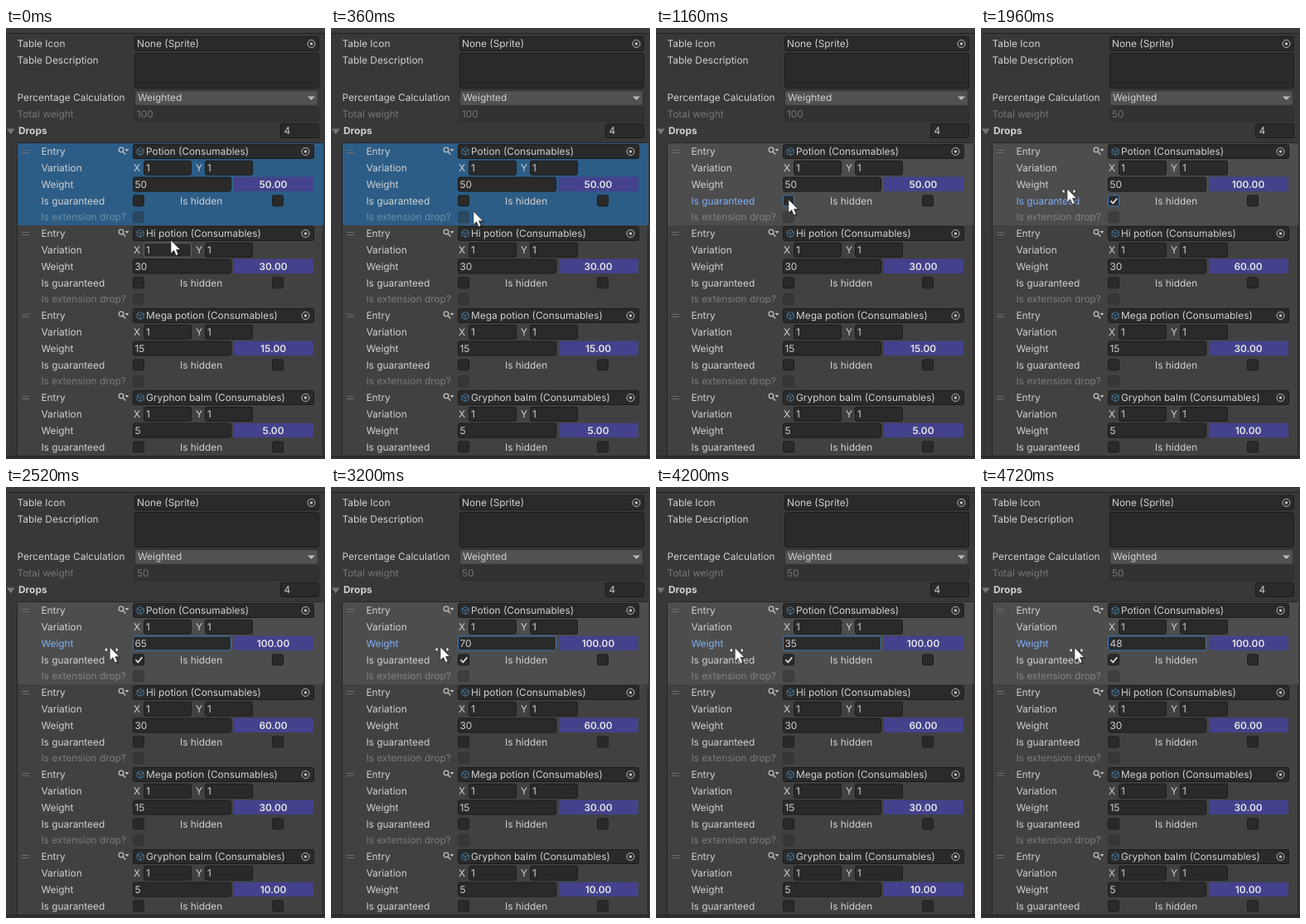
An HTML page that plays this animation: 385x520 px, repeating every 5.28 s.

```html
<!DOCTYPE html>
<html lang="en">
<head>
<meta charset="utf-8">
<title>Drop table inspector</title>
<style>
  html, body { margin: 0; width: 100%; height: 100%; overflow: hidden; background: #383838; }
  svg { display: block; width: 385px; height: 520px; }
  text { font: 11.88px Inter, Roboto, sans-serif; fill: #d0d0d0; white-space: pre; text-rendering: geometricPrecision; }
  .bold { font-weight: 700; }
  .share { text-anchor: middle; font-weight: 600; fill: #e6e6e6; }
  .dim { opacity: .4; }
  .field { fill: #2a2a2a; stroke: #1c1c1c; }
  .line { fill: none; stroke: #bdbdbd; }
  .cube { fill: none; stroke: #46799c; }
</style>
</head>
<body>
<svg id="stage" viewBox="0 0 385 520"></svg>
<script>
const LOOP = 5280, STEP = 40, ROW = 19.8;
const FOCUS = '#7fb0f8', RING = '#3a79bb';
const names = ['Potion', 'Hi potion', 'Mega potion', 'Gryphon balm'];
const weights = [50, 30, 15, 5];

const attr = (id, cls) => (id ? ` id="${id}"` : '') + (cls ? ` class="${cls}"` : '');
const text = (x, cy, s, cls, id) => `<text x="${x}" y="${cy + 4.2}"${attr(id, cls)}>${s}</text>`;
const rect = (x, y, w, h, fill, id) => `<rect x="${x}" y="${y}" width="${w}" height="${h}" fill="${fill}"${attr(id)}/>`;
const box = (x, y, w, h, id) =>
  `<rect x="${x + .5}" y="${y + .5}" width="${w - 1}" height="${h - 1}" rx="2"${attr(id, 'field')}/>`;
const check = (x, cy, id) => box(x, cy - 7, 14, 14, id);
const path = (d, style) => `<path d="${d}" ${style}/>`;
const dim = s => `<g class="dim">${s}</g>`;

const picker = (x, cy) =>
  `<circle class="line" cx="${x}" cy="${cy}" r="4.5"/><circle cx="${x}" cy="${cy}" r="1.8" fill="#bdbdbd"/>`;
const cube = (x, y) =>
  path(`M${x} ${y - 4.5}l4 2.2v4.6l-4 2.2l-4 -2.2v-4.6zM${x - 4} ${y - 2.3}l4 2.3l4 -2.3M${x} ${y}v4.500`, 'class="cube"');
const search = (x, y) =>
  `<circle class="line" cx="${x}" cy="${y}" r="2.8" stroke-width="1.3"/>` +
  path(`M${x + 2.2} ${y + 2.2}l3 3.2`, 'class="line" stroke-width="1.5"') +
  path(`M${x + 4.5} ${y - 1}h5l-2.5 3z`, 'fill="#bdbdbd"');

function header() {
  return rect(0, 0, 385, 6, '#3c3c3c') + rect(0, 6, 385, 1, '#222') +
    text(13.5, 19, 'Table Icon') + box(155, 10, 223, 18) + text(158, 19, 'None (Sprite)') + picker(368.5, 19) +
    text(13.5, 39, 'Table Description') + box(155, 30, 223, 43) +
    text(13.5, 84, 'Percentage Calculation') +
    `<rect x="155.5" y="75.5" width="221" height="18" rx="2.5" fill="#515151" stroke="#303030"/>` +
    text(159, 84, 'Weighted') + path('M364 82.500h9l-4.500 4.500z', 'fill="#bdbdbd"') +
    dim(text(13.5, 104, 'Total weight') + box(155, 95, 223, 18) + text(158, 104, '100', '', 'total')) +
    path('M1 121.500h9.500l-4.750 7z', 'fill="#777"') +
    text(15, 124, 'Drops', 'bold') + box(331, 115, 47, 18) + text(335.5, 124, '4');
}

function entry(name, i) {
  const [y, vary, weigh, sure, extra] = [0, 1, 2, 3, 4].map(n => 149 + (i * 5 + n) * ROW);
  return path(`M19 ${y - 1.5}h9m-9 3h9`, 'stroke="#6c6c6c" fill="none"') +
    text(42.4, y, 'Entry') + search(139, y - 2) +
    box(153, y - 9, 219, 18) + cube(162.2, y) + text(169, y, `${name} (Consumables)`) + picker(361.5, y) +
    text(42.4, vary, 'Variation') +
    text(154, vary, 'X') + box(166, vary - 9, 58, 18, 'x' + i) + text(169, vary, '1') +
    text(229, vary, 'Y') + box(240, vary - 9, 58, 18) + text(243, vary, '1') +
    text(42.4, weigh, 'Weight', '', 'weightLabel' + i) + box(153, weigh - 9, 119, 18, 'weightBox' + i) +
    text(155.5, weigh, weights[i], '', 'weight' + i) +
    rect(275, weigh - 9, 96, 17.5, '#44428c') + text(322.5, weigh, '', 'share', 'share' + i) +
    text(42.4, sure, 'Is guaranteed', '', 'sureLabel' + i) + check(153, sure, 'sureBox' + i) +
    text(210, sure, 'Is hidden') + check(321, sure) +
    dim(text(42.4, extra, 'Is extension drop?') + check(153, extra));
}

const list = '<clipPath id="clip"><rect y="138" width="385" height="378"/></clipPath><g clip-path="url(#clip)">' +
  '<rect x="13.5" y="138.5" width="369" height="389" rx="2" fill="#414141" stroke="#242424"/>' +
  rect(14, 139, 369, 99, '#2c5d87', 'selection') + names.map(entry).join('') +
  path('M156.500 208.500l2.800 3l5 -6', 'id="tick" fill="none" stroke="#e4e4e4" stroke-width="1.800"') + '</g>' +
  rect(0, 516, 385, 1, '#222') + rect(0, 517, 385, 3, '#303030');

const pointer = '<g id="pointer">' +
  '<g id="slide" fill="#fff" stroke="#222" stroke-width=".7"><path d="M-7 3l4 -3v6z"/><path d="M11 3l-4 -3v6z"/></g>' +
  '<path d="M2 2v16l4 -3.500l2.800 6l3 -1.400l-2.800 -5.800h5.500z" fill="#000" opacity=".25"/>' +
  '<path d="M0 0v16l3.700 -3.400l2.600 5.900l2.800 -1.200l-2.600 -5.800h5z" fill="#fff" stroke="#222" stroke-width=".6"/></g>';

document.getElementById('stage').innerHTML = header() + list + pointer;
const $ = id => document.getElementById(id);
const set = (id, prop, v) => $(id).style[prop] = v;

// time, x, y, easing towards this point
const moves = [
  [0, 199, 256], [520, 164, 211, 1], [560, 164, 211], [800, 160, 207, 1],
  [1520, 160, 207], [1960, 104, 194, 1], [2160, 104, 194], [2720, 134, 193, 1],
  [3160, 134, 193], [3200, 132, 193], [3600, 99.5, 194], [3720, 91, 194], [3880, 88, 194],
  [4000, 88, 194], [4520, 110, 194, 1], [4560, 110, 194], [4720, 113, 194]
];
// time, weight, easing
const drag = [
  [2160, 50], [2720, 71, 1], [2800, 72], [3160, 72], [3200, 70], [3600, 40], [3720, 32],
  [3880, 30], [4000, 30], [4520, 46, 1], [4560, 46], [4720, 48]
];
const smooth = p => p * p * (3 - 2 * p);

function sample(keys, t, size) {
  const n = keys.findIndex(k => k[0] > t);
  if (n === 0) return keys[0].slice(1, size + 1);
  if (n < 0) return keys[keys.length - 1].slice(1, size + 1);
  const a = keys[n - 1], b = keys[n];
  let p = (t - a[0]) / (b[0] - a[0]);
  if (b[size + 1]) p = smooth(p);
  return a.slice(1, size + 1).map((v, i) => v + (b[i + 1] - v) * p);
}

function draw(t) {
  const [x, y] = sample(moves, t, 2);
  const checked = t >= 1240, dragging = t >= 2200, toggling = t >= 1160 && !dragging;
  const sum = checked ? 50 : 100;

  $('pointer').setAttribute('transform', `translate(${x.toFixed(1)} ${y.toFixed(1)})`);
  set('slide', 'display', x < 150 && y < 199 ? '' : 'none');
  set('selection', 'fill', t < 1160 ? '#2c5d87' : '#4d4d4d');
  set('tick', 'display', checked ? '' : 'none');
  set('x1', 'stroke', t < 80 ? '#656565' : '');
  set('sureLabel0', 'fill', toggling ? FOCUS : '');
  set('sureBox0', 'stroke', toggling ? RING : '');
  set('weightLabel0', 'fill', dragging ? FOCUS : '');
  set('weightBox0', 'stroke', dragging ? RING : '');
  $('weight0').textContent = Math.round(sample(drag, t, 1)[0]);
  $('total').textContent = sum;
  weights.forEach((w, i) => $('share' + i).textContent = (w / sum * 100).toFixed(2));
}

const start = performance.now();
function tick() {
  const t = (performance.now() - start) % LOOP;
  draw(Math.floor(t / STEP) * STEP);
  requestAnimationFrame(tick);
}
draw(0);
requestAnimationFrame(tick);
</script>
</body>
</html>
```
